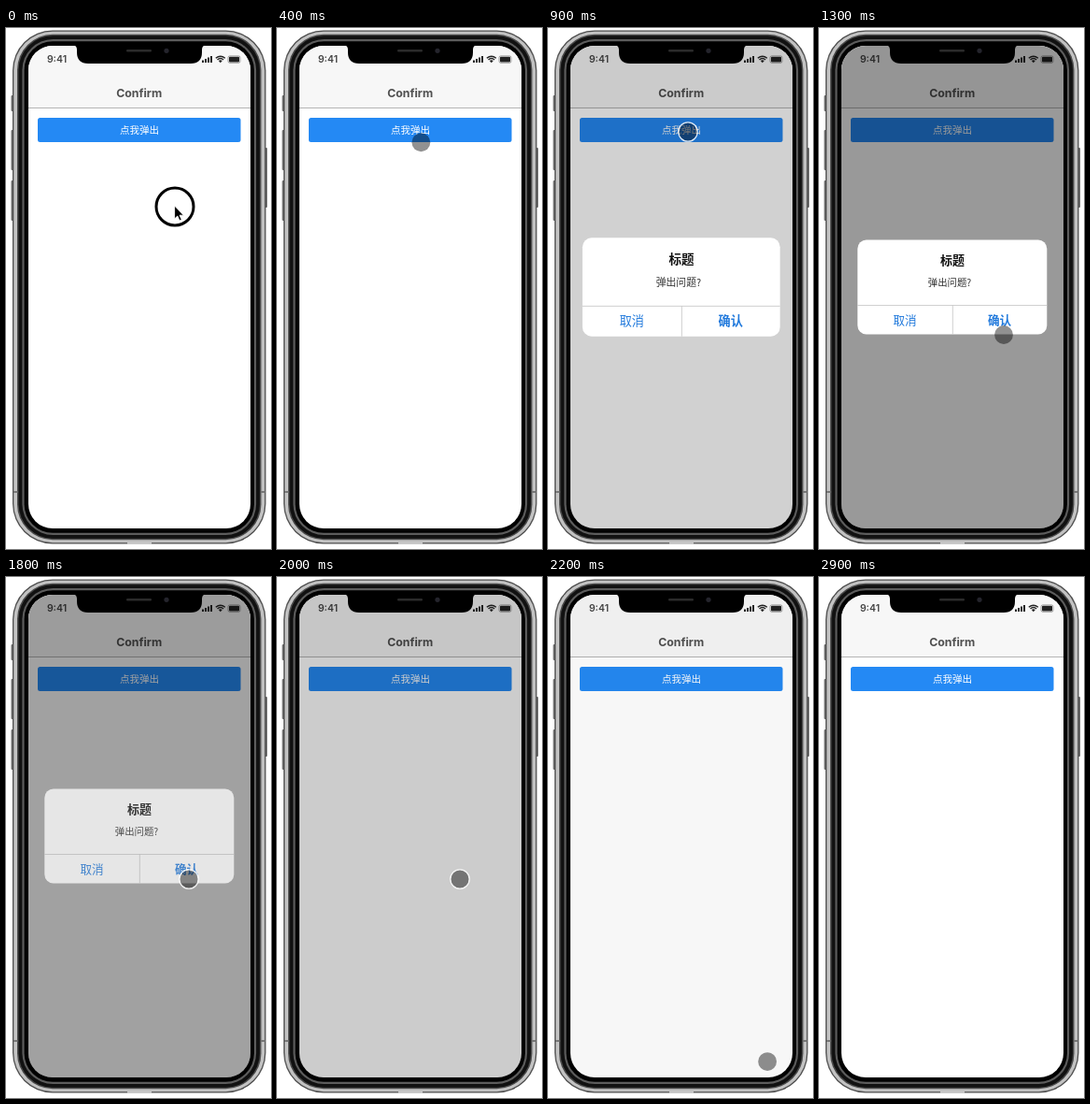
Animation, 284 px wide and 557 px high, one loop 3000 ms. Source, as an HTML page:

```html
<!DOCTYPE html>
<html lang="zh-CN">
<head>
<meta charset="utf-8">
<title>Confirm</title>
<style>
  html, body { margin: 0; width: 100%; height: 100%; overflow: hidden; background: #fff; }
  svg { display: block; width: 284px; height: 557px; }
  text { font-family: "Noto Sans CJK SC", "Noto Sans CJK", sans-serif; text-anchor: middle; }
  .latin { font-family: Inter, "Liberation Sans", sans-serif; font-weight: 600; }
  .bold { font-weight: 700; }
</style>
</head>
<body>
<svg viewBox="0 0 284 557">
  <defs>
    <clipPath id="screen"><rect x="24" y="19" width="238" height="516" rx="26"/></clipPath>
    <filter id="soft" x="-5%" y="-5%" width="110%" height="110%"><feGaussianBlur stdDeviation=".5"/></filter>
  </defs>

  <!-- phone body, from the steel rim inwards -->
  <g filter="url(#soft)">
    <g fill="#6a6a6a">
      <rect x="5.5" y="72" width="3" height="17" rx="1"/>
      <rect x="5.5" y="109" width="3" height="43" rx="1"/>
      <rect x="5.5" y="163" width="3" height="43" rx="1"/>
      <rect x="277" y="128" width="3" height="64" rx="1"/>
    </g>
    <rect x="7" y="2.5" width="271.5" height="549" rx="43" fill="#4c4c4c"/>
    <rect x="8.3" y="3.8" width="268.9" height="546.4" rx="41.7" fill="#c2c2c2"/>
    <rect x="12" y="6.8" width="261.5" height="540.4" rx="38" fill="#484848"/>
    <rect x="13.6" y="8.2" width="258.3" height="537.6" rx="36.5" fill="#111"/>
    <rect x="17.4" y="12" width="250.7" height="530" rx="33" fill="#5c5c5c"/>
    <rect x="19.6" y="14.2" width="246.3" height="525.6" rx="30.5"/>
    <rect x="8" y="495" width="4.5" height="2" fill="#777"/>
    <rect x="273" y="495" width="4.5" height="2" fill="#777"/>
    <rect x="130" y="550" width="26" height="2" fill="#c8c8c8"/>
  </g>

  <!-- page -->
  <g clip-path="url(#screen)">
    <rect x="24" y="19" width="238" height="516" fill="#fff"/>
    <rect x="24" y="19" width="238" height="66" fill="#f7f7f7"/>
    <rect x="24" y="85" width="238" height="1" fill="#b4b4b4"/>
    <text class="latin" x="54.5" y="37.4" font-size="10.5" fill="#444">9:41</text>
    <g id="bars" fill="#222"></g>
    <path d="M224.8 32.3 Q229.8 28 234.8 32.3 M226.5 34 Q229.8 31.2 233.1 34" fill="none" stroke="#222" stroke-width="1.4"/>
    <path d="M227.8 35 L229.8 37.3 L231.8 35 Q229.8 33.5 227.8 35Z" fill="#222"/>
    <rect x="239" y="30.8" width="11" height="5.6" rx="1" fill="#222"/>
    <rect x="238" y="29.9" width="13" height="7.4" rx="1.8" fill="none" stroke="#666" stroke-width=".6"/>
    <text class="latin bold" x="142.7" y="74" font-size="12.3" fill="#505050">Confirm</text>
    <rect x="34" y="96" width="217.5" height="26" rx="2.5" fill="#2489f4"/>
    <text x="143" y="112.9" font-size="10.5" fill="#fff">点我弹出</text>
    <rect id="shade" x="24" y="19" width="238" height="516" opacity="0"/>
  </g>

  <!-- notch -->
  <path d="M71 18 Q76 18.5 76 23 V26 Q76 38 88 38 H198 Q210 38 210 26 V23 Q210 18.5 215 18Z"/>
  <rect x="129" y="23" width="27" height="2.6" rx="1.3" fill="#2b2b2b"/>
  <circle cx="172" cy="24.3" r="2.6" fill="#24242c"/>

  <g id="dialog" opacity="0">
    <rect x="-101.5" y="-50.5" width="203" height="101" rx="9.5" fill="#fff"/>
    <path d="M-101.5 19.5 H101.5 M.5 19.5 V50.5" stroke="#c4c4c4" stroke-width=".8"/>
    <text class="bold" x=".2" y="-23.8" font-size="13" fill="#111">标题</text>
    <text x="-2.8" y="-1.3" font-size="10.4" fill="#333">弹出问题?</text>
    <g font-size="12.6" fill="#2079dc">
      <text x="-50.8" y="39.6">取消</text>
      <text class="bold" x="50.7" y="39.6">确认</text>
    </g>
  </g>

  <g id="touch">
    <circle r="9.9" fill="#000" fill-opacity=".43"/>
    <circle id="rim" r="10.2" fill="none" stroke="#fff" stroke-width="1.3" stroke-opacity=".85"/>
  </g>

  <g id="pointer">
    <circle cx="181" cy="191" r="20" fill="none" stroke="#000" stroke-width="3"/>
    <path d="M180.6 190 V204 L183.8 201 L186 206 L188.3 205 L186.1 200.2 H190.4Z" stroke="#fff" stroke-width=".9"/>
  </g>
</svg>
<script>
  const LOOP = 3000, STEP = 100;
  const OPEN = 700, CLOSE = 1700;
  const $ = id => document.getElementById(id);

  const progress = (t, from, to) => Math.min(1, Math.max(0, (t - from) / (to - from)));
  const smooth = p => p * p * (3 - 2 * p);
  const easeOut = p => 1 - (1 - p) ** 2;
  const easeIn = p => p * p;

  // The finger goes to the button, to the confirm label, then off the bottom
  const origin = { x: 181, y: 191 };
  const moves = [
    { from: 0, to: 640, x: 150, y: 111, ease: easeOut },
    { from: 1000, to: 1300, x: 198, y: 328, ease: smooth },
    { from: 1300, to: 1500, x: 196, y: 323, ease: smooth },
    { from: 2000, to: 2300, x: 284, y: 762, ease: easeIn }
  ];

  function finger(t) {
    return moves.reduce((pos, m) => {
      const p = m.ease(progress(t, m.from, m.to));
      return { x: pos.x + (m.x - pos.x) * p, y: pos.y + (m.y - pos.y) * p };
    }, origin);
  }

  const within = (t, from, to) => t >= from && t <= to;
  const show = (id, on) => $(id).setAttribute('visibility', on ? 'visible' : 'hidden');

  for (let i = 0; i < 4; i++) {
    const h = 2.5 + 1.5 * i;
    $('bars').innerHTML += `<rect x="${210 + 3 * i}" y="${37 - h}" width="2" height="${h}"/>`;
  }

  function draw(now) {
    const t = Math.floor(now % LOOP / STEP) * STEP;

    const dim = smooth(progress(t, OPEN, OPEN + 430)) - smooth(progress(t, CLOSE, CLOSE + 600));
    $('shade').setAttribute('opacity', .4 * dim);

    const alpha = progress(t, OPEN, OPEN + 150) - smooth(progress(t, CLOSE, CLOSE + 300));
    const scale = 1 + .2 * (1 - progress(t, OPEN, OPEN + 500)) ** 3;
    $('dialog').setAttribute('opacity', alpha);
    $('dialog').setAttribute('transform', `translate(142.8 277) scale(${scale})`);

    const { x, y } = finger(t);
    $('touch').setAttribute('transform', `translate(${x} ${y})`);
    show('touch', t >= STEP);
    show('rim', within(t, 600, 1000) || within(t, 1500, 2000));
    show('pointer', t < STEP);
  }

  const start = performance.now();
  function tick() {
    draw(performance.now() - start);
    requestAnimationFrame(tick);
  }
  tick();
</script>
</body>
</html>
```
